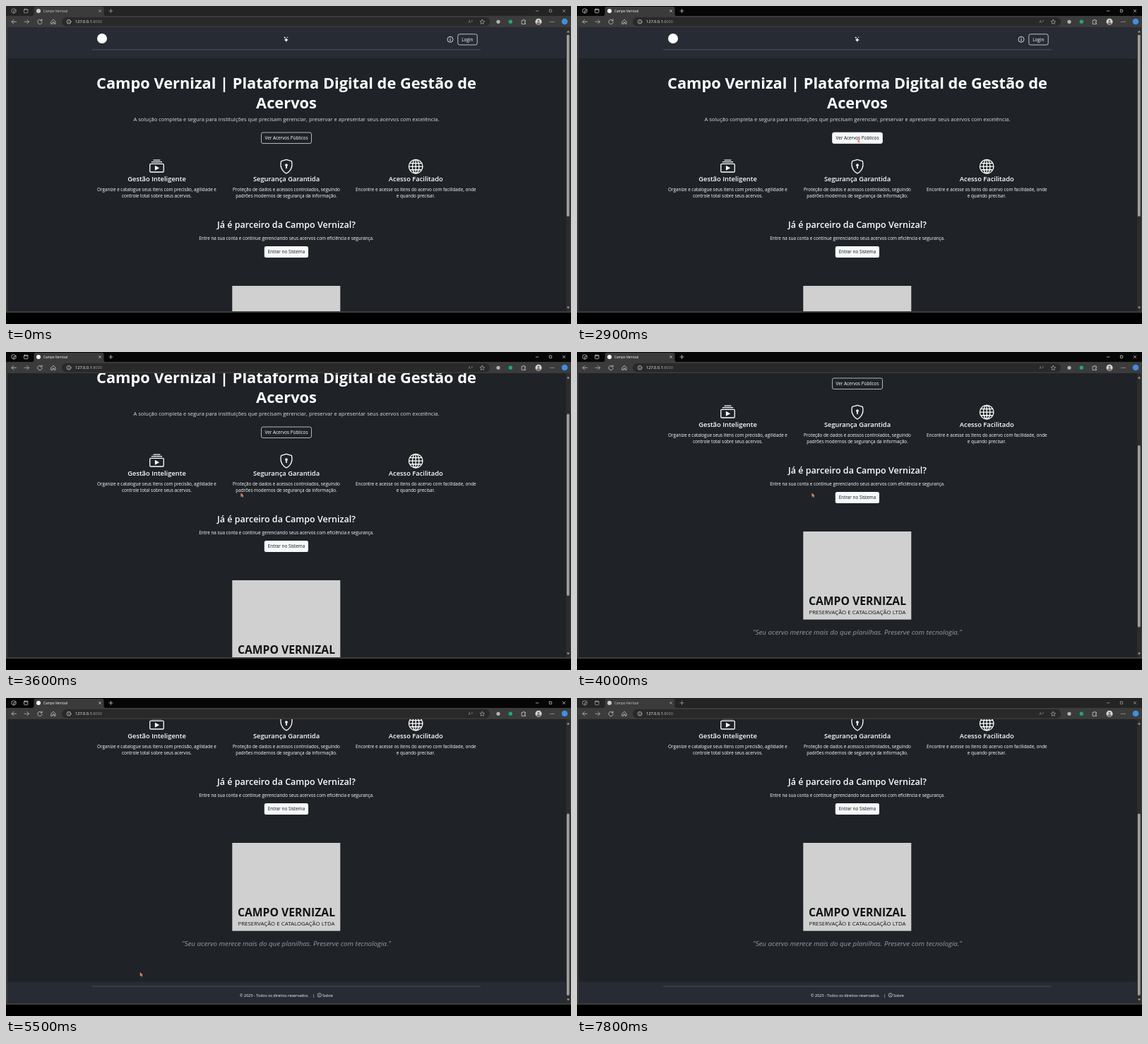
An HTML page that plays this animation: 800 px wide and 450 px high, repeating every 8000 ms.

```html
<!DOCTYPE html>
<html lang="pt-BR">
<head>
<meta charset="utf-8">
<title>Campo Vernizal</title>
<style>
  html, body { margin: 0; width: 100%; height: 100%; overflow: hidden; background: #000; }
  svg { display: block; width: 800px; height: 450px; }
  text { font-family: "Open Sans", "Noto Sans", sans-serif; fill: #fff; }
  .mid { text-anchor: middle; }
  .h1 { font-size: 21.8px; font-weight: 700; }
  .h2 { font-size: 12.5px; font-weight: 600; }
  .h3 { font-size: 9.35px; font-weight: 600; }
  .lead { font-size: 7.55px; fill: #dcdddf; }
  .p { font-size: 6.33px; }
  .small { font-size: 5.5px; }
  .quote { font-size: 9.75px; font-style: italic; fill: #96999d; }
  .dark { fill: #101214; }
  .line { fill: none; stroke: #fff; }
  .ui { fill: none; stroke: #d0d0d0; stroke-width: .75; stroke-linecap: round; stroke-linejoin: round; }
  .band { fill: #272b34; }
</style>
</head>
<body>
<svg viewBox="0 0 800 450">
  <defs>
    <clipPath id="view"><rect x="2" y="30" width="791" height="402"/></clipPath>
    <path id="star" d="M0-3Q.5-.5 3 0Q.5.5 0 3Q-.5.5-3 0Q-.5-.5 0-3z"/>
  </defs>
  <rect width="800" height="450" fill="#000"/>
  <rect y="14" width="800" height="420" fill="#3b3b3b"/>
  <rect x="2" y="30" width="791" height="402" fill="#1f2327"/>

  <g clip-path="url(#view)">
    <g id="page">
      <rect class="band" x="2" y="30" width="791" height="44"/>
      <path d="M122 61.8H672" stroke="#565a61" stroke-width=".8"/>
      <circle cx="136" cy="46" r="7" fill="#fff"/>
      <g fill="#fff">
        <use href="#star" x="396.800" y="47.900"/>
        <use href="#star" transform="translate(394.800 44.800) scale(.5)"/>
        <use href="#star" transform="translate(398.700 44.300) scale(.35)"/>
      </g>
      <g class="line">
        <circle cx="629" cy="47.300" r="4" stroke-width=".8"/>
        <path d="M629 46.500V49.800M629 44.700V45.600" stroke-width=".9"/>
        <rect x="639.800" y="39.800" width="27.400" height="15.200" rx="2.500" stroke-width=".7"/>
      </g>
      <text class="p mid" x="653.300" y="49.600">Login</text>

      <text class="h1 mid" x="397" y="117.300">Campo Vernizal | Plataforma Digital de Gestão de</text>
      <text class="h1 mid" x="397" y="145.300">Acervos</text>
      <text class="lead mid" x="397" y="162.500">A solução completa e segura para instituições que precisam gerenciar, preservar e apresentar seus acervos com excelência.</text>
      <rect id="btn" x="361.500" y="179" width="71" height="15.500" rx="2.500" fill="#f8f9fa" fill-opacity="0" stroke="#f4f5f6" stroke-width=".7"/>
      <text id="btnText" class="p mid" x="397" y="189.200">Ver Acervos Públicos</text>

      <g transform="translate(203.100 216.800) scale(1.300)" class="line">
        <path d="M4.500 1h7M2.500 3h11" stroke-linecap="round"/>
        <rect x=".5" y="5" width="15" height="9" rx="1"/>
        <path d="M6 6.800v5.400l4.800-2.700z" fill="#fff" stroke="none"/>
      </g>
      <g transform="translate(386.600 216.800) scale(1.300)" class="line">
        <path d="M8 .5C6.600 .9 4.500 1.600 2.300 2.200C1.200 6.500 2 9.500 4 12.200Q6 14.800 8 15.500Q10 14.800 12 12.200C14 9.500 14.800 6.500 13.700 2.200C11.500 1.600 9.400 .9 8 .5z"/>
        <path d="M8 5a1.500 1.500 0 0 1 .5 2.900l.4 2.100h-1.800l.4-2.100A1.500 1.500 0 0 1 8 5z" fill="#fff" stroke="none"/>
      </g>
      <g transform="translate(569.800 216.800) scale(1.300)" class="line">
        <circle cx="8" cy="8" r="7.500"/>
        <ellipse cx="8" cy="8" rx="3.600" ry="7.500"/>
        <path d="M8 .5v15M.5 8h15M1.800 4.500h12.400M1.800 11.500h12.400"/>
      </g>

      <g class="mid">
        <text class="h3" x="213.500" y="248.200">Gestão Inteligente</text>
        <text class="p" x="213.500" y="261.500">Organize e catalogue seus itens com precisão, agilidade e</text>
        <text class="p" x="213.500" y="271.400">controle total sobre seus acervos.</text>
        <text class="h3" x="397" y="248.200">Segurança Garantida</text>
        <text class="p" x="397" y="261.500">Proteção de dados e acessos controlados, seguindo</text>
        <text class="p" x="397" y="271.400">padrões modernos de segurança da informação.</text>
        <text class="h3" x="580.300" y="248.200">Acesso Facilitado</text>
        <text class="p" x="580.300" y="261.500">Encontre e acesse os itens do acervo com facilidade, onde</text>
        <text class="p" x="580.300" y="271.400">e quando precisar.</text>
        <text class="h2" x="397" y="314">Já é parceiro da Campo Vernizal?</text>
        <text class="p" x="397" y="330.700">Entre na sua conta e continue gerenciando seus acervos com eficiência e segurança.</text>
        <rect x="365.800" y="340" width="62.200" height="16" rx="2.500" fill="#f8f9fa"/>
        <text class="p dark" x="397" y="350.400">Entrar no Sistema</text>

        <rect x="320.300" y="396" width="153" height="124.600" fill="#d0d0d0"/>
        <text class="dark" x="397" y="500" font-size="15.700" font-weight="700">CAMPO VERNIZAL</text>
        <text class="dark" x="397" y="512.700" font-size="7.900">PRESERVAÇÃO E CATALOGAÇÃO LTDA</text>
        <text class="quote" x="397" y="542.300">"Seu acervo merece mais do que planilhas. Preserve com tecnologia."</text>
      </g>

      <rect class="band" x="2" y="592.500" width="791" height="31"/>
      <path d="M122 599H672" stroke="#565a61" stroke-width=".8"/>
      <text class="small" x="331" y="613.600" font-weight="500">© 2025 - Todos os direitos reservados.</text>
      <text class="small" x="433.700" y="613.600">|</text>
      <g class="line" stroke-width=".6">
        <circle cx="443.800" cy="611.500" r="2.700"/>
        <path d="M443.800 611.100V613M443.800 609.700V610.300"/>
      </g>
      <text class="small" x="448" y="613.600">Sobre</text>
    </g>
  </g>

  <!-- scrollbar -->
  <rect x="793" y="30" width="6" height="402" fill="#2c2c2c"/>
  <path d="M794 37.500l2-3 2 3zM794 425.500l2 3 2-3z" fill="#a0a0a0"/>
  <rect id="thumb" x="793.900" y="40.500" width="3.800" height="257.500" rx="1.900" fill="#9e9e9e"/>

  <!-- tab strip -->
  <rect id="strip" width="800" height="14"/>
  <path d="M37 14q2.500 0 2.500-3V3.500q0-2.500 2.500-2.500H136q2.500 0 2.500 2.500V11q0 3 2.500 3z" fill="#3b3b3b"/>
  <g id="stripIcons">
    <g class="ui">
      <path d="M11 3.800l3 1.500v3.300l-3 1.600-3-1.600V5.300zM11 7l3-1.500M11 7v3"/>
      <rect x="25.500" y="4.300" width="5.400" height="5.400" rx="1"/>
      <path d="M25.500 5.300h5.400"/>
      <path d="M131.500 5.500l3 3m0-3l-3 3M146 7h5M148.500 4.500v5"/>
      <path d="M750.300 7h3.600M788.300 5.200l3.400 3.400m0-3.400l-3.400 3.400"/>
      <rect x="769.300" y="5.200" width="3.400" height="3.400" rx=".5"/>
    </g>
    <circle cx="46" cy="7" r="3" fill="#fff"/>
    <text x="53" y="8.800" font-size="4.700">Campo Vernizal</text>
  </g>

  <!-- toolbar -->
  <rect x="79" y="16" width="606" height="12.500" rx="6.200" fill="#292929"/>
  <g class="ui">
    <path d="M14.500 22.300H8M10.800 19.500L8 22.300l2.800 2.800"/>
    <path d="M26 22.300h6.500M29.700 19.500l2.800 2.800-2.800 2.800" stroke="#bbb"/>
    <path d="M50.800 20.800a3.200 3.200 0 1 0 .4 2.200M51 18.800v2.200h-2.200"/>
    <path d="M64 22l3-2.900 3 2.900v3.300h-2v-2.300h-2v2.300h-2z"/>
    <circle cx="89" cy="22.300" r="2.900"/>
    <path d="M89 22.200v1.500M89 20.800v.1"/>
    <path d="M674.300 19.200l1 2.100 2.300.3-1.700 1.600.4 2.300-2-1.100-2 1.100.4-2.300-1.700-1.600 2.300-.3z" stroke="#a8a8a8"/>
    <path d="M659.800 20.300q.8 1 0 2" stroke="#9a9a9a"/>
    <path d="M730.500 20.500h1.600a1 1 0 1 1 1.900 0h1.500v1.700a1 1 0 1 0 0 1.800v1.500h-5z"/>
  </g>
  <text x="98" y="24.200" font-size="5.600">127.0.0.1<tspan fill="#9a9a9a">:8000</tspan></text>
  <text x="654.500" y="24.400" font-size="5.500" style="fill:#9a9a9a">A</text>
  <circle cx="697" cy="22.300" r="2.600" fill="#b4b4b4"/>
  <circle cx="714.300" cy="22.300" r="2.700" fill="#1fa878"/>
  <circle cx="754" cy="22.300" r="4.500" fill="#d9d6d3"/>
  <path d="M751 25.300q0-2.300 3-2.300t3 2.300q-3 2.300-6 0z" fill="#77736f"/>
  <circle cx="754" cy="21" r="1.600" fill="#77736f"/>
  <g fill="#ddd"><circle cx="771" cy="22.300" r=".6"/><circle cx="773.300" cy="22.300" r=".6"/><circle cx="775.600" cy="22.300" r=".6"/></g>
  <circle cx="791" cy="22" r="4.300" fill="#3f8fe0"/>

  <path id="cursor" d="M0 0V4.800L1.200 3.800 2.100 5.800 3 5.400 2.100 3.500H3.600z" fill="#f4775f" stroke="#f6c0b0" stroke-width=".3"/>
</svg>

<script>
  const LOOP = 8000, STEP = 100, THUMB_RATIO = 0.644;
  const ACTIVE = [1700, 6300];
  const CURSOR_SHOWN = [1700, 6000];

  // [time, x, y]
  const cursorPath = [
    [1800, 155, 421.5], [2700, 405, 187], [2800, 405, 187], [3300, 332.7, 199.8],
    [4300, 332.7, 199.8], [4600, 353, 205], [5500, 190, 388.5], [5950, 146, 431]
  ];
  // [time, offset]
  const scrollPath = [
    [3200, 0], [3300, 8], [3400, 27.5], [3600, 73], [3800, 111], [4000, 142],
    [4200, 169], [4400, 186], [4600, 191]
  ];

  const $ = id => document.getElementById(id);
  const within = (t, [from, to]) => t >= from && t < to;
  const linear = k => k;
  const smooth = k => k * k * (3 - 2 * k);

  function sample(path, t, ease) {
    if (t <= path[0][0]) return path[0].slice(1);
    for (let i = 1; i < path.length; i++) {
      const a = path[i - 1], b = path[i];
      if (t <= b[0]) {
        const k = ease((t - a[0]) / (b[0] - a[0]));
        return a.slice(1).map((v, j) => v + (b[j + 1] - v) * k);
      }
    }
    return path[path.length - 1].slice(1);
  }

  function draw(t) {
    const [scroll] = sample(scrollPath, t, linear);
    const [x, y] = sample(cursorPath, t, smooth);
    const shown = within(t, CURSOR_SHOWN);
    const active = within(t, ACTIVE);
    const docY = y + scroll;
    const hover = shown && x > 361 && x < 433 && docY > 179 && docY < 195;

    $('page').setAttribute('transform', `translate(0 ${-scroll})`);
    $('thumb').setAttribute('transform', `translate(0 ${scroll * THUMB_RATIO})`);
    $('cursor').setAttribute('transform', `translate(${x} ${y})`);
    $('cursor').style.display = shown ? '' : 'none';
    $('btn').setAttribute('fill-opacity', hover ? 1 : 0);
    $('btnText').style.fill = hover ? '#101214' : '';
    $('strip').setAttribute('fill', active ? '#060606' : '#242424');
    $('stripIcons').setAttribute('opacity', active ? 1 : 0.75);
  }

  const start = performance.now();
  function tick() {
    const t = (performance.now() - start) % LOOP;
    draw(Math.floor(t / STEP) * STEP);
    requestAnimationFrame(tick);
  }
  tick();
</script>
</body>
</html>
```
